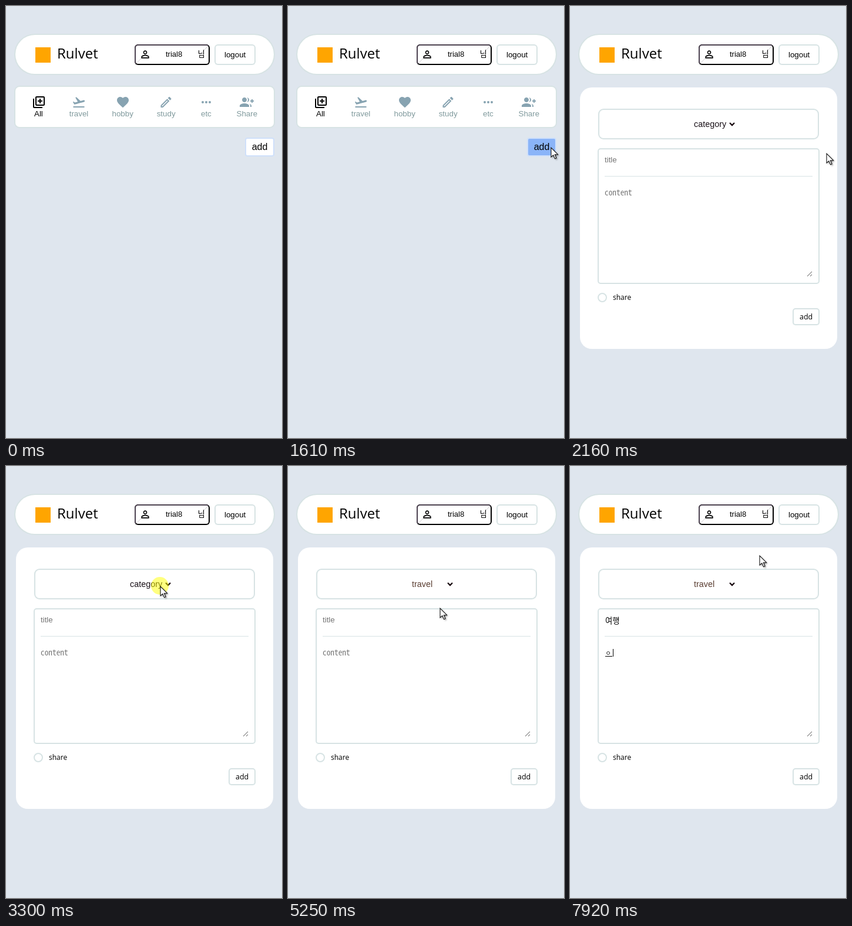
An HTML page with a canvas that plays this animation: 470x732 px, repeating every 8000 ms.

```html
<!DOCTYPE html>
<html lang="ko">
<head>
<meta charset="utf-8">
<title>Wish list</title>
<style>
  html, body { margin: 0; width: 100%; height: 100%; overflow: hidden; background: #dfe6ee; }
  canvas { display: block; }
</style>
</head>
<body>
<canvas id="stage" width="470" height="732"></canvas>
<script>
const LOOP = 8000;
const ctx = document.getElementById('stage').getContext('2d');

const ARIAL = '"Liberation Sans", Arial, sans-serif';
const HUMAN = '"Open Sans", "Noto Sans", sans-serif';
const KOREAN = '"Noto Sans CJK KR", "Noto Sans CJK", "Noto Sans CJK JP", sans-serif';
const MONO = '"Noto Sans Mono CJK KR", "Noto Sans Mono CJK JP", "Liberation Mono", monospace';
const LINE = '#d7e3e4';
const ICON = '#87a3b1';
const LABEL = '#809a9d';
const HINT = '#757575';

// Icon outlines on a 24 unit grid
const icons = {
  all: 'M4 6H2v14c0 1.1.9 2 2 2h14v-2H4V6zm16-4H8c-1.1 0-2 .9-2 2v12c0 1.1.9 2 2 2h12c1.1 0 2-.9 2-2V4c0-1.1-.9-2-2-2zm0 14H8V4h12v12zm-7-2h2v-3h3V9h-3V6h-2v3h-3v2h3z',
  plane: 'M2.5 19h19v2h-19zm19.57-9.36c-.21-.8-1.04-1.28-1.84-1.06L14.92 10l-6.9-6.43-1.93.51 4.14 7.17-4.97 1.33-1.97-1.54-1.45.39 2.59 4.49s7.12-1.9 16.57-4.43c.81-.23 1.28-1.05 1.07-1.85z',
  heart: 'M12 21.35l-1.45-1.32C5.4 15.36 2 12.28 2 8.5 2 5.42 4.42 3 7.5 3c1.74 0 3.41.81 4.5 2.09C13.09 3.81 14.76 3 16.5 3 19.58 3 22 5.42 22 8.5c0 3.78-3.4 6.86-8.55 11.54z',
  pen: 'M14.06 9.02l.92.92L5.92 19H5v-.92zM17.66 3c-.25 0-.51.1-.7.29l-1.83 1.83 3.75 3.75 1.83-1.83c.39-.39.39-1.02 0-1.41l-2.34-2.34c-.2-.2-.45-.29-.71-.29zm-3.6 3.19L3 17.25V21h3.75L17.81 9.94z',
  dots: 'M4 12a2 2 0 1 0 4 0a2 2 0 1 0-4 0zM10 12a2 2 0 1 0 4 0a2 2 0 1 0-4 0zM16 12a2 2 0 1 0 4 0a2 2 0 1 0-4 0z',
  group: 'M22 9V7h-2v2h-2v2h2v2h2v-2h2V9zM8 12c2.21 0 4-1.79 4-4S10.21 4 8 4 4 5.79 4 8s1.79 4 4 4zm0 2c-2.67 0-8 1.34-8 4v2h16v-2c0-2.66-5.33-4-8-4zM12.51 4.05C13.43 5.11 14 6.49 14 8s-.57 2.89-1.49 3.95C14.47 11.7 16 10.04 16 8s-1.53-3.7-3.49-3.95zM16.53 14.83C17.42 15.66 18 16.7 18 18v2h2v-2c0-1.45-1.59-2.51-3.47-3.17z',
  person: 'M12 5.9c1.16 0 2.1.94 2.1 2.1s-.94 2.1-2.1 2.1S9.9 9.16 9.9 8s.94-2.1 2.1-2.1zm0 9c2.97 0 6.1 1.46 6.1 2.1v1.1H5.9V17c0-.64 3.13-2.1 6.1-2.1zM12 4C9.79 4 8 5.79 8 8s1.79 4 4 4 4-1.79 4-4-1.79-4-4-4zm0 9c-2.67 0-8 1.34-8 4v3h16v-3c0-2.66-5.33-4-8-4z'
};
for (const key in icons) icons[key] = new Path2D(icons[key]);
const arrow = new Path2D('M0 0V16L3.8 12.6L6.5 18.8L9 17.7L6.4 11.7H11.6Z');

const tabs = [
  ['all', 'All', 44, 48], ['plane', 'travel', 112, 107.7], ['heart', 'hobby', 187, 180.5],
  ['pen', 'study', 260.5, 256.7], ['dots', 'etc', 329, 332], ['group', 'Share', 398, 392.5]
];
const options = ['category', 'travel', 'hobby', 'study', 'etc'];
const ROW = 17.75, LIST_TOP = 210;

// Pointer moves: start, end, number of steps, way points
const moves = [
  { t0: 400, t1: 690, n: 5, enter: true, pts: [[143, 89], [225, 52], [332, 3]] },
  { t0: 1080, t1: 1820, n: 11, enter: true, pts: [[348, 3], [372, 42], [405, 108], [434, 180], [449, 236], [446, 254], [437, 250]] },
  { t0: 2490, t1: 2990, n: 8, pts: [[437, 250], [380, 244], [290, 214], [263, 204]] },
  { t0: 3920, t1: 4320, n: 6, pts: [[263, 204], [261, 233], [259, 262]] },
  { t0: 4550, t1: 4710, n: 3, pts: [[259, 262], [259, 241]] },
  { t0: 5410, t1: 5970, n: 8, pts: [[259, 241], [256, 257], [285, 205], [318, 158], [323, 152]] }
];

function pointer(t) {
  if (t < 400 || (t >= 750 && t < 1080)) return null;
  const m = moves.filter(v => t >= v.t0).pop();
  const k = Math.min(m.n - 1, Math.floor((t - m.t0) / (m.t1 - m.t0) * (m.n - 1) + 0.01));
  const u = m.enter ? k / (m.n - 1) : (k + 1) / m.n;
  const pos = u * (m.pts.length - 1);
  const i = Math.min(m.pts.length - 2, Math.floor(pos));
  const f = pos - i, a = m.pts[i], b = m.pts[i + 1];
  return { x: Math.round(a[0] + (b[0] - a[0]) * f), y: Math.round(a[1] + (b[1] - a[1]) * f) };
}

const within = (t, a, b) => t >= a && t < b;

function rect(x, y, w, h, color) {
  ctx.fillStyle = color;
  ctx.fillRect(x, y, w, h);
}

function box(x, y, w, h, r, fill, line, lw = 2) {
  ctx.beginPath();
  ctx.roundRect(x, y, w, h, r);
  ctx.fillStyle = line || fill;
  ctx.fill();
  if (!line) return;
  ctx.beginPath();
  ctx.roundRect(x + lw, y + lw, w - 2 * lw, h - 2 * lw, Math.max(0, r - lw));
  ctx.fillStyle = fill;
  ctx.fill();
}

function text(str, x, y, size, color = '#000', family = ARIAL) {
  ctx.font = `${size}px ${family}`;
  ctx.fillStyle = color;
  ctx.fillText(str, x, y);
}

function icon(name, x, y, color, scale = 1) {
  ctx.save();
  ctx.translate(x, y);
  ctx.scale(scale, scale);
  ctx.fillStyle = color;
  ctx.fill(icons[name], 'evenodd');
  ctx.restore();
}

function stroke(points, color, width) {
  ctx.beginPath();
  points.forEach(p => ctx.lineTo(p[0], p[1]));
  ctx.strokeStyle = color;
  ctx.lineWidth = width;
  ctx.stroke();
}

function header() {
  box(14, 47, 444, 70, 35, '#fff', LINE);
  rect(50, 70, 26, 26, '#ffa500');
  text('Rulvet', 87, 89, 24, '#000', HUMAN);

  // Bevelled border: light top and left, black bottom and right
  box(219, 65, 128, 35, 6, '#fff', '#000');
  ctx.save();
  ctx.beginPath();
  [[219, 65], [347, 65], [329, 83], [236, 83], [219, 100]].forEach(p => ctx.lineTo(p[0], p[1]));
  ctx.clip();
  box(219, 65, 128, 35, 6, '#fff', '#4c4250');
  ctx.restore();
  icon('person', 227, 72, '#000', 20 / 24);
  text('trial8', 272, 86, 13, '#000');
  text('님', 326.5, 86, 13.33, '#000', KOREAN);

  box(355, 65, 70, 35, 6, '#fff', LINE);
  text('logout', 372, 87, 13.33);
}

function listPage(p) {
  box(14, 135, 444, 72, 9, '#fff', LINE);
  tabs.forEach(([name, label, ix, tx], i) => {
    icon(name, ix, 151, i ? ICON : '#000');
    text(label, tx, 187, 13.33, i ? LABEL : '#000');
  });
  const hover = p && p.x >= 407 && p.x < 457 && p.y >= 223 && p.y < 255;
  box(407, 223, 50, 32, 4, hover ? '#8ab4f8' : '#fff', '#cfe0fa');
  text('add', 418.7, 244, 16);
}

function underline(x, y) { rect(x, y, 12, 1, '#000'); }
function caret(x, y) { rect(x, y, 1, 13, '#000'); }

function titleField(t) {
  if (t < 6670) {
    text('title', 59, 265, 13.33, HINT);
    if (within(t, 5790, 6290)) rect(59, 253, 1, 15, '#000');
    return;
  }
  const steps = [[7380, '여행'], [7300, '여해'], [7220, '여ㅎ'], [6750, '여'], [6670, 'ㅇ']];
  const typed = steps.find(s => t >= s[0])[1];
  text(typed, 60, 266.5, 13.33, '#000', KOREAN);
  if (t < 7610) {
    const end = 60 + typed.length * 12.5;
    underline(Math.floor(end - 12.5), 267);
    caret(Math.floor(end), 255);
  }
}

function contentField(t) {
  if (t < 7920) {
    text('content', 59, 321, 13.33, HINT, MONO);
    if (t >= 7610) caret(59, 310);
  } else {
    text('ㅇ', 60.5, 320.5, 10, '#000', KOREAN);
    underline(60, 322);
    caret(73, 310);
  }
}

function formPage(t) {
  box(17, 138, 438, 443, 20, '#fff');
  box(48, 174, 376, 52, 9, '#fff', LINE);
  if (t < 5250) text('category', 211, 205, 14.4, '#1a1118');
  else text('travel', 211, 205, 14.4, '#5a3d31');
  stroke([[272, 198], [276, 202], [280, 198]], '#1a0a10', 2.3);

  box(47, 241, 378, 230, 5, '#fff', LINE);
  rect(59, 288, 354, 1, LINE);
  titleField(t);
  contentField(t);
  stroke([[404, 458], [412, 450]], '#555', 1);
  stroke([[409, 458], [412, 455]], '#555', 1);

  ctx.beginPath();
  ctx.arc(55, 494, 7, 0, 7);
  ctx.strokeStyle = LINE;
  ctx.lineWidth = 2;
  ctx.stroke();
  text('share', 73, 498, 12, '#000', HUMAN);
  box(379, 512, 46, 29, 5, '#fff', LINE);
  text('add', 391, 531, 12.5, '#000', HUMAN);
}

function dropdown(p) {
  ctx.save();
  ctx.shadowColor = 'rgba(0,0,0,.36)';
  ctx.shadowBlur = 42;
  ctx.shadowOffsetY = 17;
  box(207, 209, 78, 91, 5, '#9da5a8');
  ctx.restore();
  box(208, 210, 76, 89, 4, '#fff');
  const active = Math.max(0, Math.min(4, Math.floor((p.y - LIST_TOP) / ROW)));
  options.forEach((label, i) => {
    const top = Math.round(LIST_TOP + i * ROW);
    if (i === active) rect(208, top, 76, 17.5, '#1967d2');
    text(label, 212, top + 13, 14.4, i === active ? '#fff' : '#111');
  });
}

function drawPointer(p) {
  ctx.save();
  ctx.translate(p.x, p.y);
  ctx.shadowColor = 'rgba(0,0,0,.45)';
  ctx.shadowBlur = 3;
  ctx.shadowOffsetX = 2;
  ctx.shadowOffsetY = 2;
  ctx.fillStyle = '#fff';
  ctx.fill(arrow);
  ctx.shadowColor = 'transparent';
  ctx.strokeStyle = '#111';
  ctx.lineWidth = 1.1;
  ctx.stroke(arrow);
  ctx.restore();
}

function draw(t) {
  const p = pointer(t);
  rect(0, 0, 470, 732, '#dfe6ee');
  header();
  if (t < 2160) listPage(p);
  else formPage(t);
  if (within(t, 3380, 5250)) dropdown(p);
  if (within(t, 1890, 2030) || within(t, 3300, 3380) || within(t, 5170, 5250)) {
    ctx.beginPath();
    ctx.arc(p.x - 1, p.y - 1, 15, 0, 7);
    ctx.fillStyle = 'rgba(255,255,0,.5)';
    ctx.fill();
  }
  if (p) drawPointer(p);
}

const start = performance.now();
function frame() {
  draw((performance.now() - start) % LOOP);
  requestAnimationFrame(frame);
}
frame();
</script>
</body>
</html>
```
